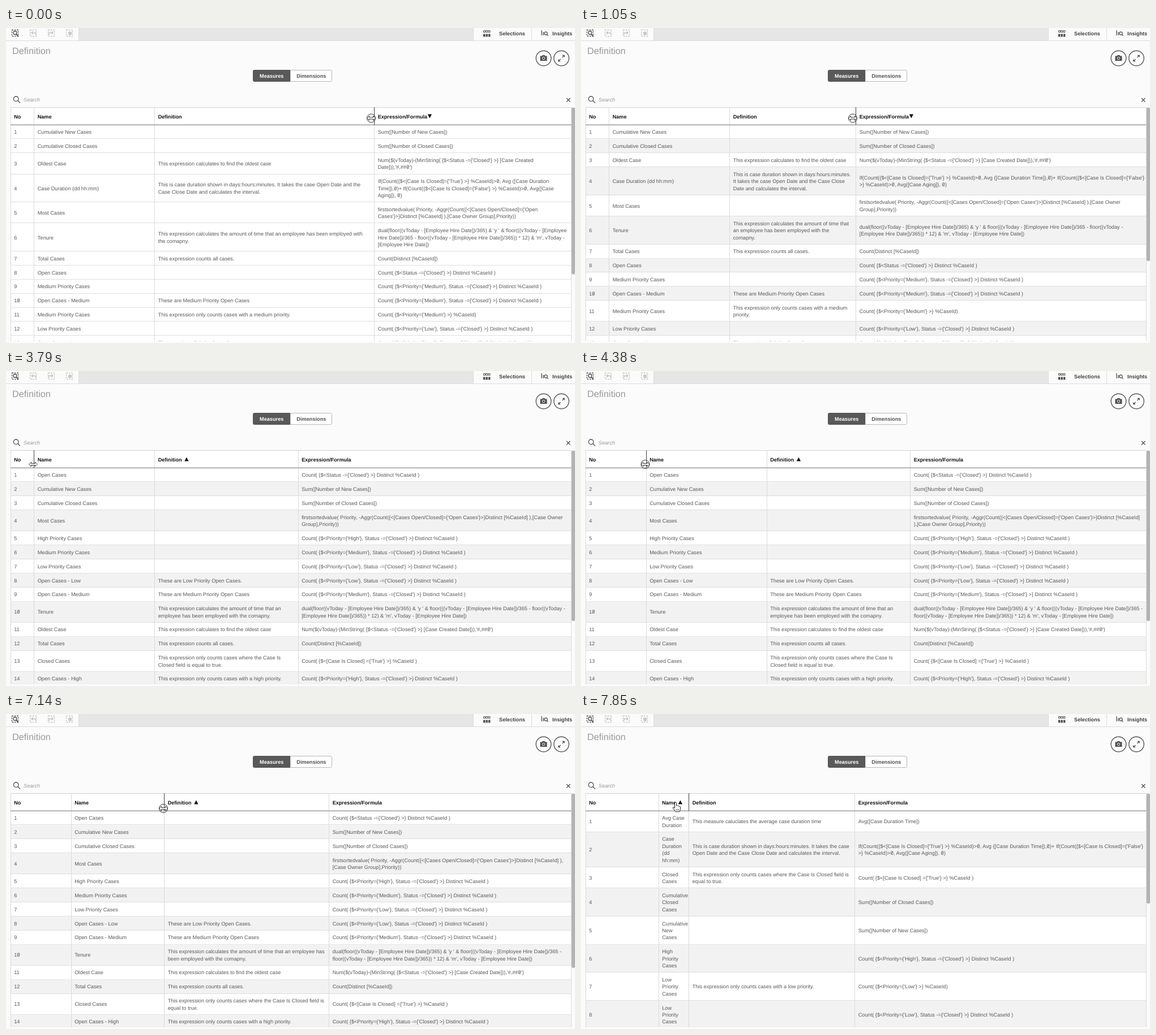
Recreate the animation shown at these times as an HTML page. Size 1005 by 557 pixels, loop 8 s.

```html
<!DOCTYPE html>
<html lang="en">
<head>
<meta charset="utf-8">
<title>Definition table</title>
<style>
  html, body { margin: 0; width: 100%; height: 100%; overflow: hidden; background: #fbfbfb; }
  svg { display: block; width: 1005px; height: 557px; }
  text { font: 9.2px "Liberation Sans", Arial, sans-serif; fill: #595959; white-space: pre; text-rendering: geometricPrecision; }
  .bold { font-weight: bold; fill: #404040; }
  .head { font-weight: bold; font-size: 9.1px; fill: #111; }
  .zero { font-family: "Noto Sans Mono", monospace; }
  .icon { fill: none; stroke: #505050; stroke-width: 1.3; }
  .faint { stroke: #c2c2c2; }
</style>
</head>
<body>
<svg viewBox="0 0 1005 557">
  <defs><clipPath id="view"><rect y="140" width="1005" height="414"/></clipPath></defs>
  <rect width="1005" height="557" fill="#fbfbfb"/>
  <rect x="129" width="696" height="22" fill="#e6e6e6"/>
  <path d="M0 22.5H1005M128.5 0V22M825.5 0V22M928.5 0V22" stroke="#dcdcdc"/>

  <g class="icon">
    <rect x="10.5" y="3.5" width="11" height="11" stroke-dasharray="2.5 1.8"/>
    <circle cx="16" cy="8.5" r="3" fill="#fbfbfb"/><path d="M18.2 10.8L22 15" stroke-width="1.8"/>
    <g class="faint">
      <path id="dash" d="M42.5 3.5h11v11h-11z" stroke-dasharray="2.5 1.8"/>
      <use href="#dash" x="32"/><use href="#dash" x="64"/>
      <path d="M52 12V8.5H45M47.5 6L45 8.5L47.5 11M76 12V8.5H83M80.5 6L83 8.5L80.5 11"/>
      <circle cx="113" cy="9.5" r="2.5"/><path d="M111.5 8l3 3m0-3l-3 3"/>
    </g>
    <path d="M843.5 4.5h3v3h-3zM847.8 4.5h3v3h-3zM852 4.5h3v3h-3z" stroke-width="1"/>
    <path d="M843 10.5h3.4v5H843zM847.5 10.5h3.4v5h-3.4zM852 10.5h3.4v5H852z" fill="#505050" stroke="none"/>
    <path d="M946 4V13M949 7V13"/><circle cx="953.5" cy="9.5" r="2.6"/><path d="M955.3 11.3L957.5 13.7"/>
  </g>
  <text class="bold" x="871" y="13">Selections</text>
  <text class="bold" x="965" y="12.5">Insights</text>

  <text x="11" y="45.5" style="font-size:16.3px;fill:#999">Definition</text>
  <g fill="#fbfbfb" stroke="#595959" stroke-width="1.4">
    <circle cx="949.5" cy="53.5" r="13.3"/><circle cx="981" cy="53.5" r="13.3"/>
  </g>
  <path d="M943.5 49.5h3l1-1.5h4l1 1.5h3v8.5h-12z" fill="#505050"/>
  <circle cx="949.5" cy="53.5" r="2.2" fill="none" stroke="#fbfbfb"/>
  <path class="icon" d="M982.5 52L986 48.5M983 48.3h3.2v3.2M979.5 55L976 58.5M979 58.7h-3.2v-3.2"/>

  <path d="M502 74.5h71.5q2 0 2 2v16q0 2-2 2H502z" fill="#fff" stroke="#b8b8b8"/>
  <path d="M438.5 74.5h63v20h-63q-2 0-2-2v-16q0-2 2-2z" fill="#595959" stroke="#505050"/>
  <text class="bold" x="448" y="88" style="fill:#fff">Measures</text>
  <text class="bold" x="513.3" y="88" style="fill:#505050">Dimensions</text>

  <circle class="icon" cx="17.7" cy="125.3" r="4.3"/><path class="icon" d="M20.8 128.5L25 132.5" stroke-width="2"/>
  <text x="31" y="130" style="font-style:italic;fill:#999">Search</text>
  <path class="icon" d="M990 124l6.5 6.5m0-6.5l-6.5 6.5" stroke-width="1"/>

  <g id="table" clip-path="url(#view)"></g>
  <g id="cursor"></g>
</svg>

<script>
const LEFT = 8, RIGHT = 998.5, TOP = 171.6, LINE = 12.42, FONT = 9.2, PAD = 6.2, LOOP = 8000;

const count = (filter, rest = " Distinct %CaseId )") => `Count( {$<${filter} >}${rest}`;
const active = "Status -={'Closed'}";
const openWith = level => count(`Priority={'${level}'}, ${active}`);
const allWith = level => count(`Priority={'${level}'}`, " %CaseId)");
const onlyCounts = what => `This expression only counts cases ${what}`;
const hired = "(vToday - [Employee Hire Date])/365";

const rows = [
  ["Cumulative New Cases", "", "Sum([Number of New Cases])"],
  ["Cumulative Closed Cases", "", "Sum([Number of Closed Cases])"],
  ["Oldest Case", "This expression calculates to find the oldest case",
    `Num($(vToday)-(MinString( {$<${active} >} [Case Created Date])),'#,##0')`],
  ["Case Duration (dd hh:mm)",
    "This is case duration shown in days:hours:minutes. It takes the case Open Date and the Case Close Date and calculates the interval.",
    "If(Count({$<[Case Is Closed]={'True'} >} %CaseId)>0, Avg ([Case Duration Time]),0)+ If(Count({$<[Case Is Closed]={'False'} >} %CaseId)>0, Avg([Case Aging]), 0)"],
  ["Most Cases", "",
    "firstsortedvalue( Priority, -Aggr(Count({<[Cases Open/Closed]={'Open Cases'}>}Distinct [%CaseId] ),[Case Owner Group],Priority))"],
  ["Tenure", "This expression calculates the amount of time that an employee has been employed with the comapny.",
    `dual(floor(${hired}) & 'y ' & floor((${hired} - floor(${hired})) * 12) & 'm', vToday - [Employee Hire Date])`],
  ["Total Cases", "This expression counts all cases.", "Count(Distinct [%CaseId])"],
  ["Open Cases", "", count(active)],
  ["Medium Priority Cases", "", openWith("Medium")],
  ["Open Cases - Medium", "These are Medium Priority Open Cases", openWith("Medium")],
  ["Medium Priority Cases", onlyCounts("with a medium priority."), allWith("Medium")],
  ["Low Priority Cases", "", openWith("Low")],
  ["Open Cases - Low", "These are Low Priority Open Cases.", openWith("Low")],
  ["Low Priority Cases", onlyCounts("with a low priority."), allWith("Low")],
  ["High Priority Cases", "", openWith("High")],
  ["Open Cases - High", onlyCounts("with a high priority."), openWith("High")],
  ["Closed Cases", onlyCounts("where the Case Is Closed field is equal to true."),
    count("[Case Is Closed] ={'True'}", " %CaseId )")],
  ["Avg Case Duration", "This measure caluclates the average case duration time", "Avg([Case Duration Time])"],
];

// Row order, sorted column and arrow offset for each sorting
const sorts = {
  expression: { order: rows.map((_, i) => i), col: 3, offset: 88, down: true },
  definition: { order: [7, 0, 1, 4, 14, 8, 11, 12, 9, 5, 2, 6, 16, 15, 13, 10, 3, 17], col: 2, offset: 46.5 },
  name: { order: [17, 3, 16, 1, 0, 14, 13, 11, 8, 10, 4, 2, 7, 15, 12, 9, 5, 6], col: 1, offset: 28.5 },
};

// Timeline of held states: widths are those of the first three columns
const states = [{ t: 0, widths: [41.5, 213, 388], sort: "expression", kind: "ring", x: 645, y: 159.5, lit: 3, plain: true }];
const last = () => states[states.length - 1];
const at = (t, change) => states.push({ ...last(), t, ...change });
function steps(t0, t1, n, change) {
  for (let i = 0; i < n; i++) at(t0 + (t1 - t0) * i / (n - 1), change((i + 1) / n));
}
function drag(t0, t1, n, col, width) {
  const from = last(), delta = width - from.widths[col];
  steps(t0, t1, n, k => ({
    widths: from.widths.map((w, i) => i === col ? w + delta * k : w),
    x: from.x + delta * k, kind: "ring", lit: col + 1, plain: false,
  }));
}
function move(t0, t1, n, x, y, extra) {
  const from = last();
  steps(t0, t1, n, k => ({ x: from.x + (x - from.x) * k, y: from.y + (y - from.y) * k, kind: "hand", ...extra }));
}

drag(100, 600, 5, 2, 215);
drag(930, 1170, 3, 2, 227);
drag(1410, 1530, 2, 2, 253.5);
at(1640, { sort: "definition", kind: "arrows", x: 510, y: 158 });
move(1750, 2100, 4, 160, 160, { lit: 2 });
at(2230, { kind: "arrows", x: 48, y: 160, lit: 1 });
at(2350, { kind: "hand", x: 60, y: 157, lit: 2 });
move(2590, 2700, 2, 54, 161);
move(3180, 3290, 2, 49, 163);
at(3790, { kind: "arrows", x: 48, y: 165, lit: 1 });
drag(4030, 4380, 4, 0, 107);
at(4500, { kind: "hand", x: 230, y: 160 });
at(4620, { kind: "arrows", x: 328, y: 159, lit: 2 });
at(4760, { kind: "ring" });
drag(5110, 5310, 3, 1, 164.5);
at(5410, { widths: [107, 164.5, 291], kind: "hand", x: 327, y: 158, lit: 3 });
move(5740, 5860, 2, 292, 162);
at(5980, { kind: "arrows", x: 279, y: 168, lit: 2 });
move(6100, 6220, 2, 234, 163, { lit: 3 });
move(6340, 6450, 2, 274, 163);
at(6800, { kind: "arrows", x: 278, y: 167, lit: 2 });
at(7140, { kind: "ring" });
drag(7260, 7500, 3, 1, 53.5);
at(7610, { widths: [129, 53.5, 293], kind: "hand", x: 167, y: 156 });
at(7850, { sort: "name" });

const pen = document.createElement("canvas").getContext("2d");
pen.font = '100px "Liberation Sans", Arial, sans-serif';
const measure = s => pen.measureText(s).width * FONT / 100;

function wrap(text, room) {
  const lines = [""];
  for (const part of text.split(/(?<= )|(?<=\),)(?=\[)/)) {
    const joined = lines[lines.length - 1] + part;
    if (joined === part || measure(joined.trimEnd()) <= room) lines[lines.length - 1] = joined;
    else lines.push(part);
  }
  return lines;
}

const escape = s => s.replace(/&/g, "&amp;").replace(/</g, "&lt;");
const label = (x, y, s, cls = "") =>
  `<text x="${x}" y="${y}" class="${cls}">${escape(s).replace(/0/g, '<tspan class="zero">0</tspan>')}</text>`;
const box = (x, y, w, h, fill, extra = "") =>
  `<rect x="${x}" y="${y}" width="${w}" height="${h}" fill="${fill}" ${extra}/>`;
const line = (d, color, width = 1) => `<path d="${d}" fill="none" stroke="${color}" stroke-width="${width}"/>`;

function drawTable({ widths, sort, lit, plain }) {
  const edges = [LEFT];
  widths.forEach(w => edges.push(edges[edges.length - 1] + w));
  const span = RIGHT - edges[3];
  // Formula text runs a little wide in long lines, so its room grows with the column
  const rooms = [widths[1] - 12, widths[2] - 12, span * 1.03 - 22.5];
  const { order, col, offset, down } = sorts[sort];
  let body = "", y = TOP;

  order.forEach((id, i) => {
    const cells = rows[id].map((s, c) => wrap(s, c === 1 ? rooms[c] * FONT / 9.22 : rooms[c]));
    const height = LINE * (Math.max(...cells.map(c => c.length)) + 1);
    const middle = y + height / 2 + 3.2;
    if (y < 556) {
      if (i % 2 && !plain) body += box(LEFT, y, RIGHT - LEFT, height, "#f2f2f2");
      body += line(`M${LEFT} ${Math.round(y + height) - .5}H${RIGHT}`, "#dedede");
      body += label(LEFT + PAD, middle, String(i + 1));
      cells.forEach((lines, c) => lines.forEach((s, n) => {
        body += label(edges[c + 1] + PAD, middle + (n - (lines.length - 1) / 2) * LINE, s);
      }));
    }
    y += height;
  });

  const snap = x => Math.floor(x) + .5;
  const rules = edges.map(x => `M${snap(x)} 140V554`).join("") + `M${RIGHT} 140V554`;
  const heads = ["No", "Name", "Definition", "Expression/Formula"]
    .map((s, i) => label(edges[i] + PAD, 159.5, s, "head")).join("");
  const ax = edges[col] + PAD + offset;
  const arrow = down ? `M${ax} 152.5h7.4l-3.7 7z` : `M${ax} 159.5h7.4l-3.7-7z`;
  const thumb = 413 * 413 / (y - 140.5 + 25);

  document.getElementById("table").innerHTML =
    box(LEFT, 140, RIGHT - LEFT, 414, "#fff") + body + line(rules, "#dadada") +
    line(`M${LEFT} 140.5H${RIGHT}`, "#d2d2d2") + line(`M${LEFT} 171.3H${RIGHT}`, "#8c8c8c", 1.2) +
    line(`M${snap(edges[lit])} 140V171`, "#404040") + heads + `<path d="${arrow}" fill="#111"/>` +
    box(999, 140.5, 6, thumb, "#b3b3b3", 'rx="3"');
}

const arrows = '<path d="M-7.5 0L-3.5-4V-1.5H3.5V-4L7.5 0L3.5 4V1.5H-3.5V4Z" fill="#fff" stroke="#222" stroke-width=".9"/>';
const cursors = {
  arrows,
  ring: arrows + '<circle r="7.5" fill="none" stroke="#333" stroke-width="1"/>',
  hand: '<path d="M-1.5 1.2Q-1.5 0 0 0T1.5 1.2V6Q3-.1+6 4 6.6Q6 5.8 6.4 7.4Q8.6 7 8.6 9V12.5L7 16.8H0L-4.6 10.5Q-5 8.6-3 9L-1.5 10.6Z" fill="#fff" stroke="#222" stroke-linejoin="round"/><path d="M1 12v3M3.2 12v3M5.4 12v3" stroke="#222" stroke-width=".7"/>'.replace("Q3-.1+6 4 6.6", "Q3.4 5 4 6.6"),
};

function drawCursor({ kind, x, y }) {
  document.getElementById("cursor").innerHTML = `<g transform="translate(${x} ${y})">${cursors[kind]}</g>`;
}

let shown;
function frame(now) {
  const t = now % LOOP;
  const state = states.findLast(s => s.t <= t + .5);
  if (state !== shown) {
    drawTable(state);
    drawCursor(state);
    shown = state;
  }
  requestAnimationFrame(() => frame(performance.now() - start));
}
const start = performance.now();
frame(0);
</script>
</body>
</html>
```
